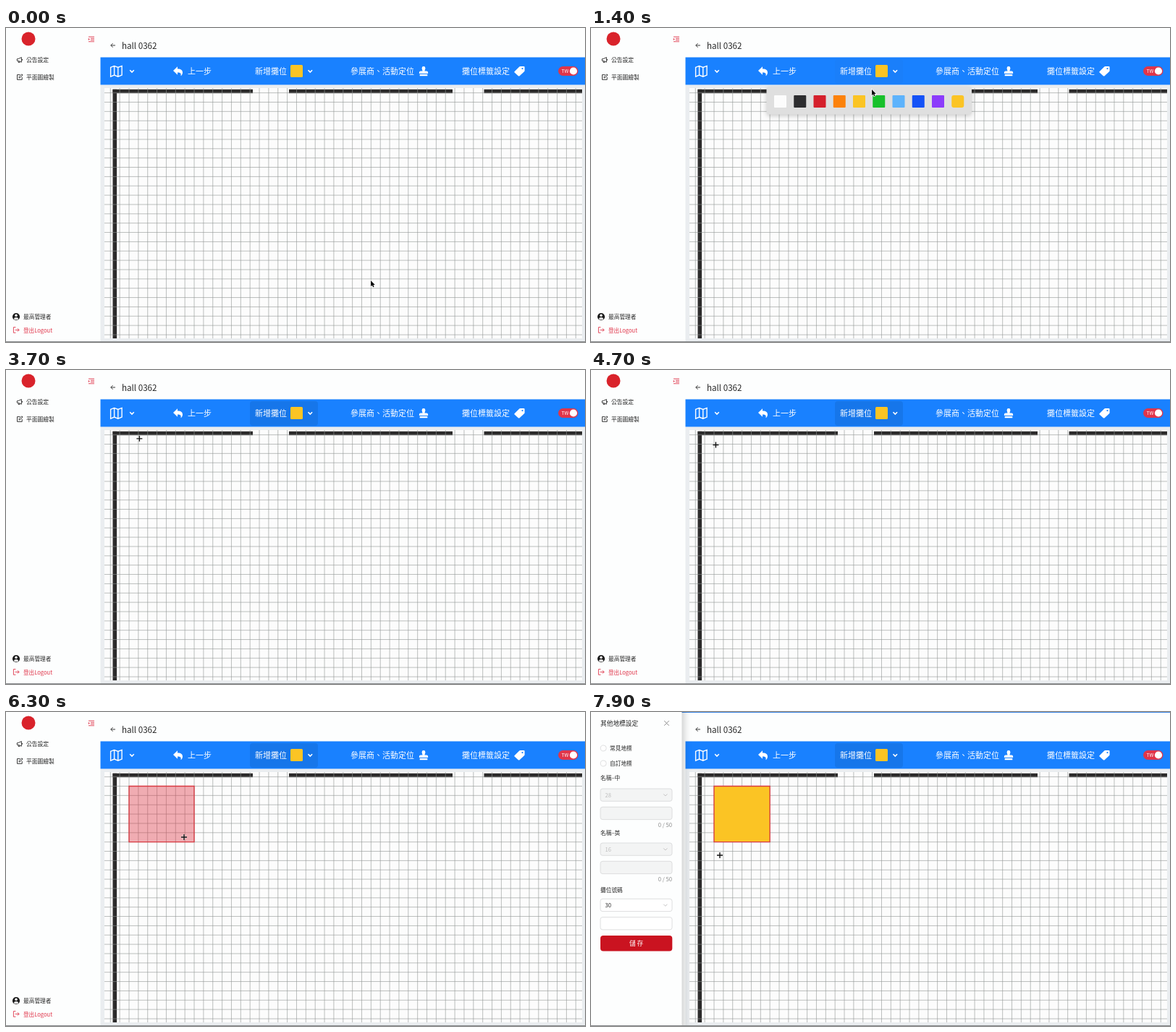
An HTML page with a canvas that plays this animation: 800x434 px, repeating every 8 s.

```html
<!DOCTYPE html>
<html lang="zh-TW">
<head>
<meta charset="utf-8">
<title>Floor plan editor</title>
<style>
html, body { margin: 0; width: 100%; height: 100%; overflow: hidden; background: #fdfefe; }
canvas { display: block; width: 800px; height: 434px; }
</style>
</head>
<body>
<canvas id="stage"></canvas>
<script>
const W = 800, H = 434, LOOP = 8000, STEP = 100;
const FONT = '"Noto Sans CJK TC", "Noto Sans CJK", "Noto Sans", sans-serif';
const BLUE = '#1981ff', RED = '#e0354a', YELLOW = '#fbc424', INK = '#262626', WALL = '#2c2b2b';
const CELL = 12.86, BOOTH = { x: 170, y: 102.5 };
const VIEW = { x: 136, y: 83, w: 660, h: 346 };

const PICKER_OPEN = 300, PICKER_CLOSE = 3300, PICKED = 1900;
const DRAG = 5000, DROP = 6700, DRAWER = 6850;

// time, x, y
const POINTER = [
  [0, 504, 349], [100, 487, 278], [300, 401, 61], [500, 401, 62],
  [1400, 388, 85], [1800, 371, 101], [2600, 371, 101], [3100, 252, 69],
  [3500, 190, 91], [4000, 174, 102], [5000, 172, 104], [5900, 246, 173],
  [6600, 246, 173], [7000, 245, 171], [7600, 179, 198], [7900, 178, 198]
];

const canvas = document.getElementById('stage');
const ctx = canvas.getContext('2d');
const ratio = window.devicePixelRatio || 1;
canvas.width = W * ratio;
canvas.height = H * ratio;

function rect(x, y, w, h, color) {
  ctx.fillStyle = color;
  ctx.fillRect(x, y, w, h);
}

function box(x, y, w, h, r, fill, stroke, line = 0.8) {
  ctx.beginPath();
  ctx.roundRect(x, y, w, h, r);
  if (fill) { ctx.fillStyle = fill; ctx.fill(); }
  if (stroke) { ctx.strokeStyle = stroke; ctx.lineWidth = line; ctx.stroke(); }
}

function disc(x, y, r, fill, stroke, line = 0.8) {
  box(x - r, y - r, 2 * r, 2 * r, r, fill, stroke, line);
}

// y is the optical middle of the line
function text(str, x, y, size, color, weight = 400, align = 'left') {
  ctx.font = `${weight} ${size}px ${FONT}`;
  ctx.textAlign = align;
  ctx.fillStyle = color;
  ctx.fillText(str, x, y + size * 0.37);
}

function fillPath(d, color) {
  ctx.fillStyle = color;
  ctx.fill(new Path2D(d));
}

function strokePath(d, color, width = 1) {
  ctx.strokeStyle = color;
  ctx.lineWidth = width;
  ctx.stroke(new Path2D(d));
}

function chevron(x, y, r, color, width) {
  strokePath(`M${x - r} ${y - r / 2}L${x} ${y + r / 2}L${x + r} ${y - r / 2}`, color, width);
}

function shadow(color, blur, dx = 0, dy = 0) {
  ctx.shadowColor = color;
  ctx.shadowBlur = blur * ratio;
  ctx.shadowOffsetX = dx * ratio;
  ctx.shadowOffsetY = dy * ratio;
}

function pointerAt(t) {
  let i = 0;
  while (i < POINTER.length - 2 && t >= POINTER[i + 1][0]) i++;
  const [t0, x0, y0] = POINTER[i], [t1, x1, y1] = POINTER[i + 1];
  const p = Math.min(1, (t - t0) / (t1 - t0));
  const e = p * p * (3 - 2 * p);
  return { x: x0 + (x1 - x0) * e, y: y0 + (y1 - y0) * e };
}

function drawSidebar() {
  disc(31, 15, 9.5, '#d9232b');
  strokePath('M114 12.2H122M117 14.4H122M117 16.6H122M114 18.8H122', RED, 0.9);
  fillPath('M113.8 13.9V17.1L115.9 15.5Z', RED);

  strokePath('M15.3 42.8L17.6 42.4L21.4 40.6V47.2L17.6 45.6L15.3 45.2ZM17 45.6V47.6H18.9V46.3M22.4 43V44.8', INK, 0.9);
  text('公告設定', 28, 44, 7.75, INK);
  strokePath('M19.5 64.6H15.5V71.4H22.2V68M18 69L18.3 67.3L21.8 63.8L23 65L19.5 68.6Z', INK, 0.9);
  text('平面圖繪製', 28, 68, 7.75, INK);

  disc(14, 399, 5.1, '#1c1c1c');
  disc(14, 397.3, 1.7, '#fff');
  fillPath('M10.8 402Q11.4 399.9 14 399.9Q16.6 399.9 17.2 402Q16 403.2 14 403.2Q12 403.2 10.8 402Z', '#fff');
  text('最高管理者', 24, 399.5, 7.7, INK, 500);
  strokePath('M13.4 413.6H10.4V421.2H13.4M12.6 417.4H18M15.9 415.2L18.1 417.4L15.9 419.6', RED, 0.9);
  text('登出Logout', 24, 417.7, 7.6, RED);
}

function drawToolbar(t) {
  strokePath('M151 24H144.8M147.6 21.2L144.8 24L147.6 26.8', INK, 0.9);
  text('hall 0362', 160, 24.5, 11.6, INK);

  rect(130.5, 40.5, 669.5, 38, BLUE);
  if (t >= PICKED) box(337, 43, 94, 34, 4, '#1676ea');
  else if (t >= PICKER_OPEN) box(337, 43, 94, 34, 4, '#1a7ffa');

  strokePath('M144.6 54.4L149.6 52.4L154.8 54.4L160.1 52.4V65.1L154.8 67.2L149.6 65.1L144.6 67.2ZM149.6 52.4V65.1M154.8 54.4V67.2', '#fff', 1.4);
  chevron(174, 59.7, 2.8, '#fff', 1.6);

  fillPath('M231 59L237 53.2V56.5C242 56.5 244 58.5 244 61.5C244 63.5 243 65.3 241.5 66.3C242.3 62.8 241 61.7 237 61.6V64.8Z', '#fff');
  text('上一步', 251, 60, 11, '#fff');

  text('新增攤位', 344, 60, 11, '#fff');
  box(393, 51, 17, 17, 1.5, YELLOW);
  chevron(420.3, 59.7, 2.8, '#fff', 1.6);

  text('參展商、活動定位', 476, 60, 11, '#fff');
  fillPath('M574.6 55.4a2.4 2.4 0 1 1 4.8 0c0 1.8-.9 2.4-.9 4h2.6a2 2 0 0 1 2 2v1.6h-12.2v-1.6a2 2 0 0 1 2-2h2.6c0-1.6-.9-2.2-.9-4ZM571.7 64.1h10.6v2.1h-10.6Z', '#fff');

  text('攤位標籤設定', 630, 60, 11, '#fff');
  fillPath('M702.5 60.3L709.3 53.4Q709.8 53 710.5 53H715.4Q716.6 53 716.6 54.2V59Q716.6 59.7 716 60.3L709.6 66.2Q708.7 67 707.8 66.2L702.6 61.6Q702 61 702.5 60.3Z', '#fff');
  disc(713.5, 56.1, 1.1, BLUE);

  box(763, 53, 27.5, 13, 6.5, RED);
  text('TW', 767.5, 59.6, 6.6, '#fff');
  disc(784, 59.5, 5.1, '#fff');
}

function drawPlan() {
  rect(130.5, 78.5, 669.5, H - 78.5, '#eaedf0');
  rect(VIEW.x, VIEW.y, VIEW.w, VIEW.h, '#fcfcfc');
  ctx.save();
  ctx.beginPath();
  ctx.rect(VIEW.x, VIEW.y, VIEW.w, VIEW.h);
  ctx.clip();
  for (const [from, to] of [[147.5, 341], [391, 617], [660.5, 796]]) {
    rect(from, 84.8, to - from, 5.4, WALL);
  }
  rect(147.5, 84.8, 5.6, 344.2, WALL);
  ctx.beginPath();
  for (let x = BOOTH.x - 2 * CELL; x < 796; x += CELL) {
    ctx.moveTo(x, VIEW.y);
    ctx.lineTo(x, 429);
  }
  for (let y = BOOTH.y - CELL; y < 429; y += CELL) {
    ctx.moveTo(VIEW.x, y);
    ctx.lineTo(796, y);
  }
  ctx.strokeStyle = 'rgba(145,150,148,.68)';
  ctx.lineWidth = 0.9;
  ctx.stroke();
  ctx.restore();
}

function drawBooth(t, pointer) {
  if (t < DRAG) return;
  const dropped = t >= DROP;
  const span = d => Math.max(1, Math.round(d / CELL) + 1);
  const cols = dropped ? 6 : span(pointer.x - BOOTH.x);
  const rows = dropped ? 6 : span(pointer.y - BOOTH.y);
  box(BOOTH.x, BOOTH.y, cols * CELL, rows * CELL, 0,
    dropped ? YELLOW : 'rgba(220,50,65,.4)', '#d93a42', 1.3);
}

function drawPicker(t) {
  if (t < PICKER_OPEN || t >= PICKER_CLOSE) return;
  ctx.save();
  ctx.beginPath();
  ctx.rect(130, 78.5, 670, 60);
  ctx.clip();
  shadow('rgba(0,0,0,.2)', 6, 0, 2);
  box(242.5, 81, 283.5, 38.5, 4, '#dfdfdf');
  ctx.restore();
  const colors = ['#fcfcfc', '#2d2d2f', '#d5202c', '#fc820b', YELLOW,
    '#18c12b', '#5db3fc', '#1452f7', '#8c3cfb', YELLOW];
  colors.forEach((c, i) => box(253 + i * 27.25, 93, 17, 17, i === 9 ? 3 : 1, c));
}

function field(y, value, disabled) {
  const fill = disabled ? '#f3f4f4' : '#fff';
  box(13, y, 99, 17.3, 3, fill, '#d6d7d8');
  box(13, y + 25.3, 99, 17.3, 3, fill, '#d6d7d8');
  text(value, 19.5, y + 9, 7.6, disabled ? '#bdbdbd' : INK);
  chevron(102.8, y + 8.7, 2.6, '#b5b5b5', 0.8);
  if (disabled) text('0 / 50', 112, y + 50, 7.7, '#8d8d8d', 400, 'right');
}

function drawDrawer(t) {
  if (t < DRAWER - 50) return;
  rect(0, 0, W, 1, '#3c86e4');
  const p = Math.max(0, Math.min(1, (t - DRAWER) / 300));
  const slide = -126 * Math.pow(1 - p, 4.3);
  ctx.save();
  ctx.translate(slide, 0);
  ctx.save();
  shadow('rgba(0,0,0,.22)', 10, 2);
  rect(-10, -20, 135.5, H + 40, '#fdfefe');
  ctx.restore();

  text('其他地標設定', 13, 16, 8.7, INK, 500);
  strokePath('M101.2 12.2L107.8 18.8M107.8 12.2L101.2 18.8', '#777', 0.8);
  [['常見地標', 50], ['自訂地標', 71]].forEach(([label, y]) => {
    disc(17.2, y, 4, '#fff', '#d6d7d8');
    text(label, 26, y + 0.4, 7.7, INK, 500);
  });
  text('名稱–中', 13, 91.3, 7.7, INK);
  field(106, '28', true);
  text('名稱–英', 13, 166.8, 7.7, INK);
  field(181, '16', true);
  text('攤位號碼', 13, 245.7, 7.7, INK);
  field(258.3, '30', false);
  box(13, 309, 99.3, 21.5, 4, '#ca1320');
  text('儲 存', 62.6, 320, 8.7, '#fff', 400, 'center');
  ctx.restore();
}

function drawPointer(t, { x, y }) {
  if (t >= 3400) {
    const cross = `M${x - 4} ${y}H${x + 4}M${x} ${y - 4}V${y + 4}`;
    strokePath(cross, 'rgba(255,255,255,.7)', 2.6);
    strokePath(cross, '#111', 1.4);
    return;
  }
  ctx.save();
  ctx.translate(x, y);
  const arrow = 'M0 0V8.2L1.9 6.5L3.1 9.2L4.6 8.5L3.4 5.9H5.8Z';
  strokePath(arrow, '#fff', 1.5);
  fillPath(arrow, '#0a0a0a');
  ctx.restore();
}

function draw(t) {
  const pointer = pointerAt(t);
  ctx.setTransform(ratio, 0, 0, ratio, 0, 0);
  rect(0, 0, W, H, '#fdfefe');
  drawSidebar();
  drawPlan();
  drawToolbar(t);
  drawBooth(t, pointer);
  drawPicker(t);
  drawDrawer(t);
  rect(0, 433, W, 1, '#85888a');
  drawPointer(t, pointer);
}

const start = performance.now();
function tick() {
  const t = (performance.now() - start) % LOOP;
  draw(Math.floor(t / STEP) * STEP);
  requestAnimationFrame(tick);
}
tick();
</script>
</body>
</html>
```
